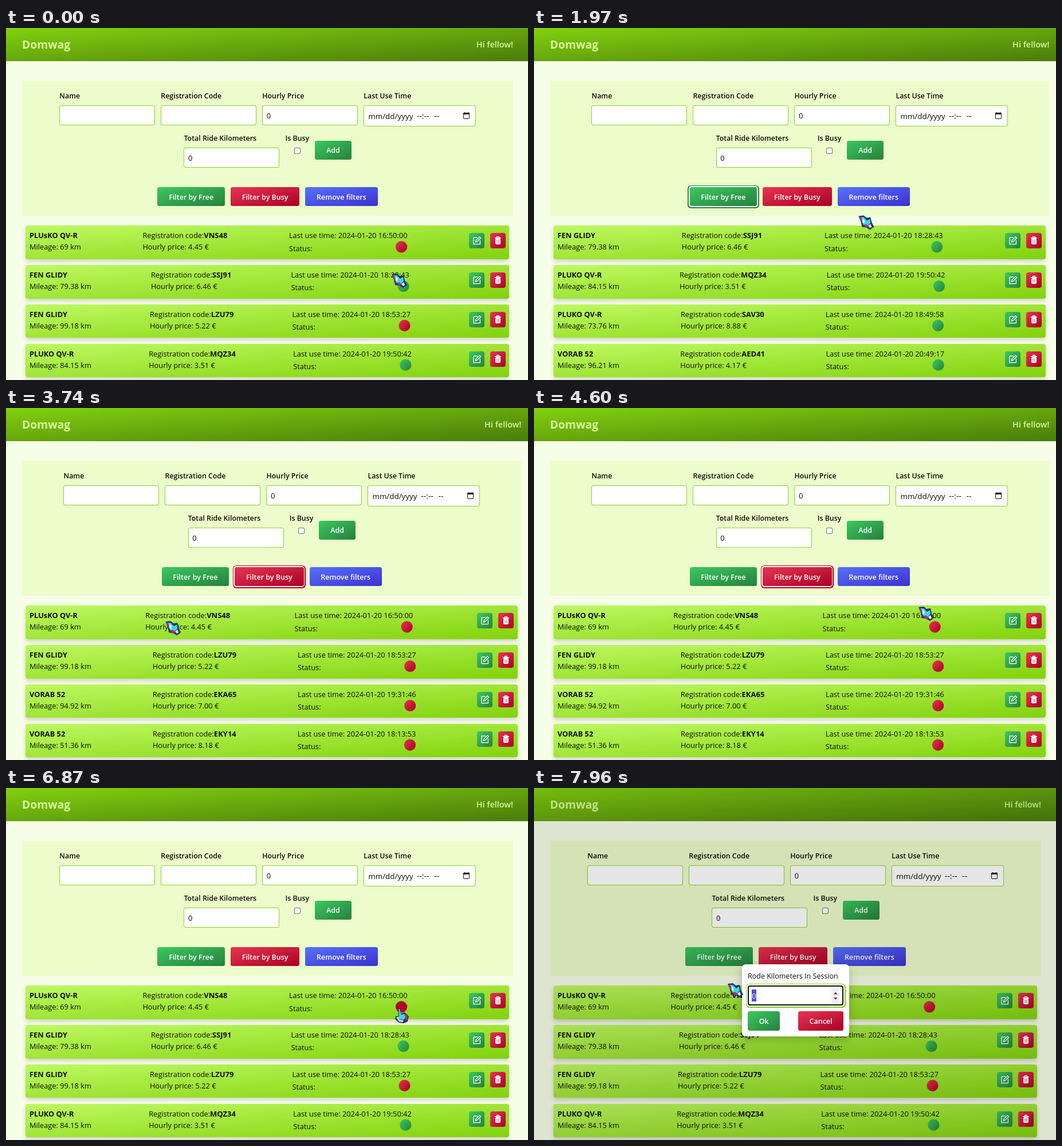
Recreate the animation shown at these times as an HTML page with a canvas. Size 911 px wide and 615 px high, loop 7.99 s.

```html
<!DOCTYPE html>
<html lang="en">
<head>
<meta charset="utf-8">
<title>Scooter rental list</title>
<style>
html, body { margin: 0; width: 100%; height: 100%; overflow: hidden; background: #f7fee7; }
canvas { display: block; }
</style>
</head>
<body>
<canvas id="stage" width="911" height="615"></canvas>
<script>
const ctx = document.getElementById('stage').getContext('2d');
const LOOP = 7990;
const FAMILY = '"Open Sans", "Noto Sans", sans-serif';
const GAP = 10;
const HOVER_LAG = 60, CLICK_FLASH = 80, CLICK_LAG = 115;

const THEME = {
  green: { base: ['#3bc960', '#26803c'], hover: ['#26853f', '#1b5430'] },
  red:   { base: ['#e83550', '#a90025'], hover: ['#b4002a', '#74101f'] },
  blue:  { base: ['#5573fa', '#3d30d0'], hover: ['#4132d2', '#302b92'] }
};

const SCOOTERS = [
  'VNS48|PLUsKO QV-R|69|4.45|16:50:00|busy',
  'SSJ91|FEN GLIDY|79.38|6.46|18:28:43|free',
  'LZU79|FEN GLIDY|99.18|5.22|18:53:27|busy',
  'MQZ34|PLUKO QV-R|84.15|3.51|19:50:42|free',
  'SAV30|PLUKO QV-R|73.76|8.88|18:49:58|free',
  'EKA65|VORAB 52|94.92|7.00|19:31:46|busy',
  'EKY14|VORAB 52|51.36|8.18|18:13:53|busy',
  'AED41|VORAB 52|96.21|4.17|20:49:17|free'
].map(line => line.split('|'));

// Each click activates the next step: free, busy, no filter, dialog
const CLICKS = [1420, 2880, 5010, 6780];
const FILTER_STEPS = ['', 'free', 'busy', '', ''];
const FILTERS = [['Filter by Free', 'green'], ['Filter by Busy', 'red'], ['Remove filters', 'blue']];

// Pointer moves: leave, arrive, x, y
const HOME = [673, 429];
const MOVES = [
  [60, 870, 352, 310], [1070, 1160, 346, 299], [1480, 2190, 631, 336], [2210, 2490, 485, 294],
  [3000, 3670, 270, 372], [3690, 4300, 686, 386], [4300, 4600, 671, 347], [4600, 5000, 586, 300],
  [5410, 5590, 586, 313], [5590, 6240, 686, 385], [7140, 7700, 297, 365], [7700, 7960, 338, 341]
];

function pointerAt(t) {
  let [x, y] = HOME;
  for (const [leave, arrive, toX, toY] of MOVES) {
    const u = Math.min(1, Math.max(0, (t - leave) / (arrive - leave)));
    const e = u * u * (3 - 2 * u);
    x += (toX - x) * e;
    y += (toY - y) * e;
  }
  return [x, y];
}

// What the pointer touches in the current picture
const touch = { x: 0, y: 0, enabled: true, any: false };

function touched(x, y, w, h) {
  const hit = touch.enabled && touch.x >= x && touch.x <= x + w && touch.y >= y && touch.y <= y + h;
  touch.any ||= hit;
  return hit;
}

// Corner-to-corner gradient, as CSS "to bottom right"
function diagonal(x, y, w, h, [from, to]) {
  const k = w * h / (w * w + h * h), cx = x + w / 2, cy = y + h / 2;
  const g = ctx.createLinearGradient(cx - h * k, cy - w * k, cx + h * k, cy + w * k);
  g.addColorStop(0, from);
  g.addColorStop(1, to);
  return g;
}

// Filled box with its edges on whole pixels
function box(x, y, w, h, r, fill) {
  const left = Math.round(x), top = Math.round(y);
  ctx.beginPath();
  ctx.roundRect(left, top, Math.round(x + w) - left, Math.round(y + h) - top, r);
  ctx.fillStyle = Array.isArray(fill) ? diagonal(x, y, w, h, fill) : fill;
  ctx.fill();
}

function framed(x, y, w, h, r, border, line = 1) {
  box(x, y, w, h, r, border);
  box(x + line, y + line, w - 2 * line, h - 2 * line, r - line, '#fff');
}

function focusRing(x, y, w, h, color) {
  box(x - 3.5, y - 3.5, w + 7, h + 7, 6, color);
  box(x - 1.7, y - 1.7, w + 3.4, h + 3.4, 5, '#fff');
}

function shadowed(blur, offset, color, paint) {
  ctx.save();
  Object.assign(ctx, { shadowBlur: blur, shadowOffsetY: offset, shadowColor: color });
  paint();
  ctx.restore();
}

function setFont(size, weight) { ctx.font = `${weight} ${size}px ${FAMILY}`; }

function widthOf(str, size = 12.8, weight = 400) {
  setFont(size, weight);
  return ctx.measureText(str).width;
}

function text(str, x, y, size = 12.8, weight = 400, color = '#0b0f05', align = 'left') {
  setFont(size, weight);
  ctx.fillStyle = color;
  ctx.textAlign = align;
  ctx.fillText(str, x, y);
}

const label = (str, x, y) => text(str, x, y, 12.4, 600);

// Places items of the given widths in a centred line
function centred(center, widths) {
  let x = center - (widths.reduce((a, b) => a + b) + GAP * (widths.length - 1)) / 2;
  return widths.map(w => (x += w + GAP) - w - GAP);
}

const buttonWidth = str => widthOf(str, 12.5, 600) + 39.5;

function button(str, theme, x, y, focus) {
  const w = buttonWidth(str), h = 33.4, tone = THEME[theme];
  const hover = touched(x, y, w, h);
  if (focus) focusRing(x, y, w, h, tone.hover[0]);
  box(x, y, w, h, 3.5, hover ? tone.hover : tone.base);
  text(str, x + w / 2, y + 21.6, hover ? 13.7 : 12.5, 600, '#fff', 'center');
}

function field(name, x, y, w, value = '', h = 35.3) {
  label(name, x, y - 12);
  framed(x, y, w, h, 4, '#8ad32a');
  text(value, x + 7.5, y + 23, 13);
}

function header(right) {
  box(0, 0, 911, 58, 0, ['#82d10f', '#4a7c0b']);
  text('Domwag', 28, 36, 19.3, 700, '#d9f99d');
  text('Hi fellow!', right, 33.5, 14.4, 600, '#d9f99d', 'right');
}

function calendarIcon(x, y) {
  framed(x, y, 11, 11, 2, '#111');
  box(x, y, 11, 3, 1, '#111');
  box(x + 2, y - 1, 1, 1, 0, '#111');
  box(x + 8, y - 1, 1, 1, 0, '#111');
}

function form(right, focusIndex) {
  const center = (28 + right) / 2, wide = 167, dateWidth = 195.5;
  box(28, 92, right - 28, 236, 0, '#ecfccb');

  const [name, code, price, date] = centred(center, [wide, wide, wide, dateWidth]);
  field('Name', name, 135, wide);
  field('Registration Code', code, 135, wide);
  field('Hourly Price', price, 135, wide, '0');
  field('Last Use Time', date, 135, dateWidth, '', 36.5);
  text('mm/dd/yyyy', date + 8, 158.5, 13.4);
  text('--:--', date + 92.5, 158.5, 14);
  text('--', date + 123, 158.5, 14);
  calendarIcon(date + 174, 148);

  const busyWidth = widthOf('Is Busy', 12.4, 600);
  const [ride, busy, add] = centred(center, [wide, busyWidth, buttonWidth('Add')]);
  field('Total Ride Kilometers', ride, 209, wide, '0');
  label('Is Busy', busy, 197);
  framed(busy + busyWidth / 2 - 5.5, 209, 11, 11, 2.5, '#767676');
  button('Add', 'green', add, 196.5);

  const places = centred(center, FILTERS.map(([str]) => buttonWidth(str)));
  FILTERS.forEach(([str, theme], i) => button(str, theme, places[i], 278, i === focusIndex));
}

function icon(x, y, theme, path) {
  box(x, y, 27, 27, 4, THEME[theme].base);
  ctx.save();
  ctx.translate(Math.round(x), Math.round(y));
  ctx.strokeStyle = '#fff';
  ctx.lineWidth = 1.2;
  ctx.stroke(new Path2D(path));
  ctx.restore();
}

function trashIcon(x, y) {
  icon(x, y, 'red', 'M11.5 8v-1.4h4v1.4');
  box(x + 8, y + 8, 11, 2, 1, '#fff');
  box(x + 9, y + 10, 9, 10, 2, '#fff');
  for (let i = 0; i < 3; i++) box(x + 11 + i * 2, y + 12, 1, 6, 0, '#e08a98');
}

function status(x, y, theme) {
  const size = 20.2, tone = THEME[theme];
  const hover = touched(x, y, size, size);
  ctx.beginPath();
  ctx.arc(x + size / 2, y + size / 2, size / 2, 0, 7);
  ctx.fillStyle = hover ? tone.hover[0] : diagonal(x, y, size, size, tone.base);
  ctx.fill();
}

function row([code, name, mileage, price, time, state], y, right) {
  const ride = `Mileage: ${mileage} km`, reg = 'Registration code:';
  const used = `Last use time: 2024-01-20 ${time}`;
  const left = 41, icons = right - 77, regWidth = widthOf(reg);
  const nameWidth = Math.max(widthOf(name, 12.8, 700), widthOf(ride));
  const codeWidth = regWidth + widthOf(code, 13, 700);
  const usedWidth = widthOf(used);
  const space = (icons - left - nameWidth - codeWidth - usedWidth) / 3;
  const codeX = left + nameWidth + space, usedX = icons - space - usedWidth;

  shadowed(7, 4, 'rgba(0,0,0,.16)', () => box(34.3, y, right - 41, 58.5, 4, ['#bef962', '#82d20c']));
  text(name, left, y + 22, 12.8, 700);
  text(ride, left, y + 42);
  text(reg, codeX, y + 22);
  text(code, codeX + regWidth, y + 22, 13, 700);
  text(`Hourly price: ${price} €`, codeX, y + 42);
  text(used, usedX, y + 22);
  text('Status:', usedX, y + 44.3);
  status(usedX + usedWidth - 20.5, y + 27, state === 'busy' ? 'red' : 'green');
  icon(icons, y + 13.2, 'green', 'M15 8.2h-7v11.5h11.4v-7M11.5 16l.7-3 6.2-6.2 2.1 2.1-6.2 6.2z');
  trashIcon(icons + 37, y + 13.2);
}

function dialog() {
  ctx.fillStyle = 'rgba(0,0,0,.1)';
  ctx.fillRect(0, 0, 911, 615);
  shadowed(16, 5, 'rgba(0,0,0,.22)', () => box(363, 308, 187, 126, 6, '#fff'));
  text('Rode Kilometers In Session', 373, 333, 12.5, 500);
  focusRing(373, 345, 167, 35, '#80cf10');
  framed(373, 345, 167, 35, 4, '#111', 2);
  box(380, 352, 8, 21, 0, '#4d4fd6');
  text('0', 380.3, 367.5, 13, 400, '#fff');
  box(519, 350, 14, 26, 0, '#f0f0f0');
  ctx.fillStyle = '#444';
  ctx.fill(new Path2D('M523 360.5h6.5l-3.25-4zM523 366h6.5l-3.25 4z'));
  button('Ok', 'green', 373, 390.3);
  button('Cancel', 'red', 540.3 - buttonWidth('Cancel'), 390.3);
}

const ARROW = [
  ['#25316f', 'M0 1L9 0l5 4 7-1 2 9 4 8-7 5-7-4-7-1-2-9z'],
  ['#3fd5dc', 'M3 3h6l6 6 5-3 1 7-5 5-8-2z'],
  ['#b72c83', 'M1 2l4 2 2 6-2 2zM8 17l5-2 5 5-4 1z'],
  ['#e8f6fa', 'M7 5l4 4-1 5-3-2zM17 18l4-3 2 5-3 2z']
].map(([color, d]) => [color, new Path2D(d)]);

const HAND = [
  ['#25316f', 'M-1.5 1L1 0l3 9 6-2 7 7-2 9-7 3-8-1-7-6 1-5 5-1z'],
  ['#3fd5dc', 'M-.5 1H1l3 10 5-1 3 5-4 5-8-1-2-4 2-2z'],
  ['#b72c83', 'M10 9l5 5-1 7-3-1z'],
  ['#f0e8f4', 'M-5 16l3-1 3 5 7 1-2 3-6-1z']
].map(([color, d]) => [color, new Path2D(d)]);

function pointer(t) {
  ctx.save();
  ctx.translate(...pointerAt(t));
  if (CLICKS.some(c => t >= c && t < c + CLICK_FLASH)) {
    ctx.beginPath();
    ctx.arc(0, 0, 10, 0, 7);
    ctx.fillStyle = 'rgba(240,150,5,.8)';
    ctx.fill();
  }
  for (const [color, path] of touch.any ? HAND : ARROW) {
    ctx.fillStyle = color;
    ctx.fill(path);
  }
  ctx.restore();
}

function draw(t) {
  const clicksBefore = time => CLICKS.filter(c => time >= c).length;
  const step = clicksBefore(t - CLICK_LAG);
  const filter = FILTER_STEPS[step], modal = step === CLICKS.length;
  const right = filter ? 899.4 : 885;
  const [x, y] = pointerAt(t - HOVER_LAG);
  Object.assign(touch, { x, y, enabled: !modal, any: false });

  ctx.fillStyle = '#f7fee7';
  ctx.fillRect(0, 0, 911, 615);
  header(right);
  form(right, clicksBefore(t) - 1);
  SCOOTERS.filter(s => !filter || s[5] === filter).slice(0, 4)
    .forEach((scooter, i) => row(scooter, 345.2 + i * 68.8, right));
  if (modal) dialog();
  pointer(t);
}

const start = performance.now();
function tick() {
  draw((performance.now() - start) % LOOP);
  requestAnimationFrame(tick);
}
tick();
</script>
</body>
</html>
```
